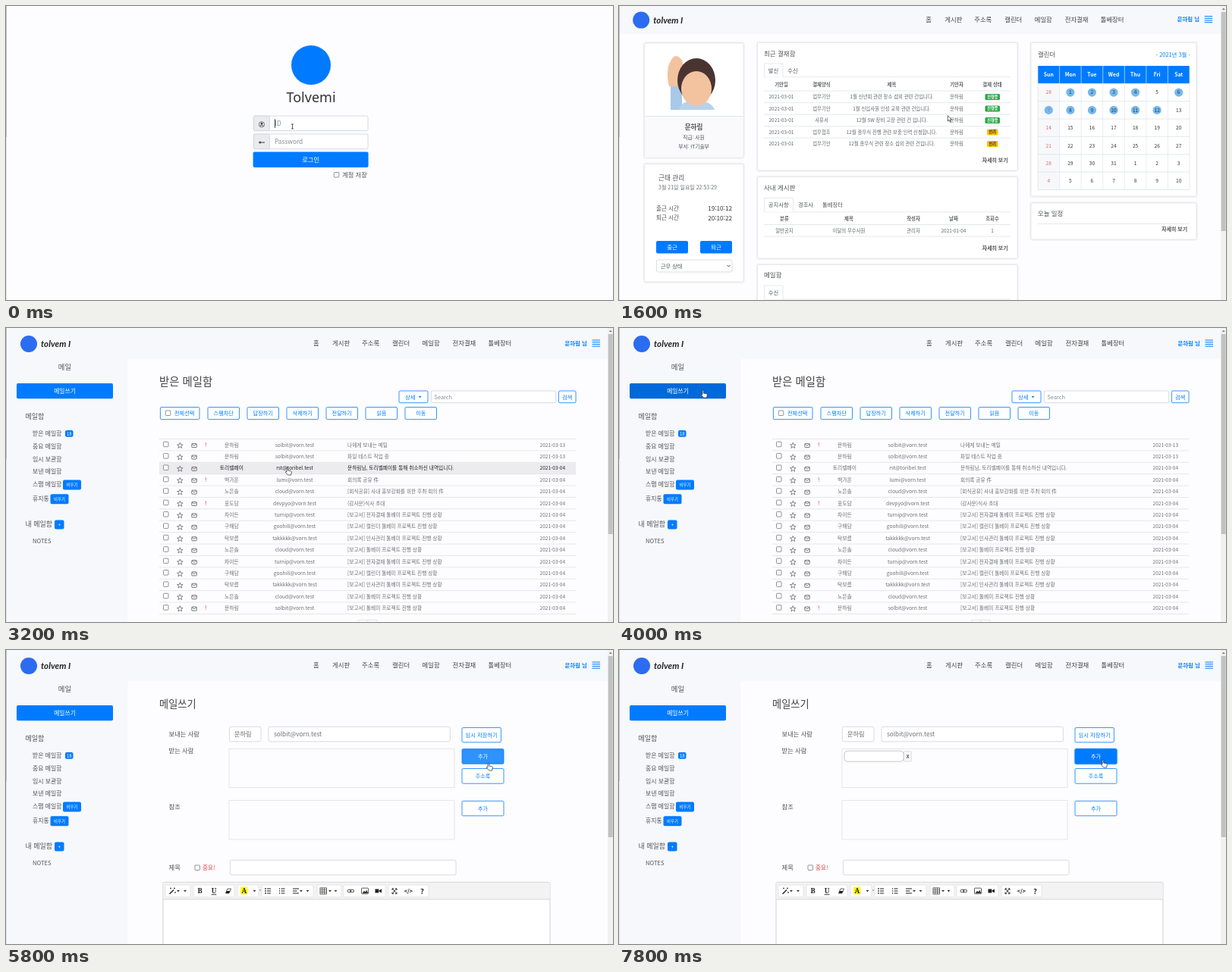
Animation of 800 by 388 pixels, one loop 8 s. Source, as an HTML page:

```html
<!DOCTYPE html>
<html lang="ko">
<head>
<meta charset="utf-8">
<title>Groupware</title>
<style>
html, body { margin: 0; width: 100%; height: 100%; overflow: hidden; background: #fdfcfe; }
svg {
  display: block; width: 100%; height: 100%;
  font-family: 'Noto Sans CJK KR', 'Noto Sans CJK', 'Noto Sans', sans-serif;
  font-variant-ligatures: no-contextual;
}
.card { filter: drop-shadow(0 .8px 1.2px rgba(0, 0, 0, .16)); }
</style>
</head>
<body>
<svg id="stage" viewBox="0 0 800 388"></svg>
<script>
const LOOP = 8000, STEP = 200;
const BLUE = '#007bff', DARK = '#0069d9', INK = '#505358', HINT = '#868e96';
const PALE = '#f6f8fb', LINE = '#dee2e6', EDGE = '#ced4da';
const MID = 'text-anchor="middle"', END = 'text-anchor="end"', BOLD = 'font-weight="700"';
const ME = '문하림', MY_MAIL = 'solbit@vorn.test';

// y is the optical middle of the text
const txt = (x, y, s, size = 8, fill = INK, more = '') =>
  `<text x="${x}" y="${(y + size * .37).toFixed(2)}" font-size="${size}" fill="${fill}" ${more}>${s}</text>`;
const mid = (x, y, s, size, fill, more = '') => txt(x, y, s, size, fill, MID + ' ' + more);
const box = (x, y, x2, y2, fill = '#fff', stroke = 'none', r = 0, more = '') =>
  `<rect x="${x}" y="${y}" width="${x2 - x}" height="${y2 - y}" fill="${fill}" stroke="${stroke}" stroke-width=".8" rx="${r}" ${more}/>`;
const path = (d, stroke = INK, w = .8, fill = 'none') =>
  `<path d="${d}" stroke="${stroke}" stroke-width="${w}" fill="${fill}"/>`;
const rule = (x, x2, y, c = LINE) => path(`M${x} ${y}H${x2}`, c, .8);
const dot = (x, y, r, fill, more = '') => `<circle cx="${x}" cy="${y}" r="${r}" fill="${fill}" ${more}/>`;
const tri = (x, y, c = '#333') => path(`M${x - 2} ${y - 1}h4l-2 2.3z`, 'none', 0, c);
const check = (x, y) => box(x, y, x + 6.5, y + 6.5, '#fff', '#777', 1);
const card = (x, y, x2, y2) => box(x, y, x2, y2, '#fff', '#e6e6ea', 1.5, 'class="card"');
const field = (x, y, x2, y2) => box(x, y, x2, y2, '#fff', EDGE, 2);
const solid = (x, y, x2, y2, s, size = 8, fill = BLUE) =>
  box(x, y, x2, y2, fill, 'none', 2) + mid((x + x2) / 2, (y + y2) / 2, s, size, '#fff');
const ring = (x, y, x2, y2) =>
  `<rect x="${x}" y="${y}" width="${x2 - x}" height="${y2 - y}" rx="2.5" fill="none" stroke="${BLUE}" stroke-opacity=".35" stroke-width="2.6"/>`;

// fade: 0 outlined, 1 filled
function outline(x, y, x2, y2, s, size = 7.2, fade = 0) {
  return box(x, y, x2, y2, '#fff', BLUE, 1.5) +
    box(x, y, x2, y2, BLUE, 'none', 1.5, `fill-opacity="${fade}"`) +
    mid((x + x2) / 2, (y + y2) / 2, s, size, fade > .5 ? '#fff' : BLUE);
}

// time, x, y of the pointer tip
const WAY = [
  [0, 377.5, 159], [400, 377, 159], [600, 375, 178], [800, 379, 190], [1000, 383, 199], [1200, 383, 199],
  [1400, 400, 182], [2000, 500, 70], [2400, 555, 17], [2600, 555, 16], [2800, 530, 60], [3200, 370, 184],
  [3600, 330, 187], [4000, 110, 82], [4200, 114, 86], [4400, 119.5, 97], [4800, 240, 150], [5400, 520, 175],
  [5800, 635, 149], [6000, 635, 146], [6200, 634, 160], [6400, 634, 164], [6600, 636, 149], [6800, 637, 145], [8000, 637, 145]
];
function pointer(t) {
  const i = Math.max(1, WAY.findIndex(k => k[0] >= t));
  const [a, b] = [WAY[i - 1], WAY[i]], p = (t - a[0]) / (b[0] - a[0]);
  return [a[1] + (b[1] - a[1]) * p, a[2] + (b[2] - a[2]) * p];
}
const inside = ([px, py], x, y, x2, y2) => px >= x && px <= x2 && py >= y && py <= y2;

const CURSOR = {
  arrow: path('M0 0V7.4L1.8 5.8 3 8.5l1.1-.5L2.9 5.4H5.2z', '#222', .7, '#fff'),
  hand: path('M0 .8C0-.4 1.7-.4 1.7.8V4l3.6.8c.9.2 1.2.8 1 1.6L5.6 10H1.6L-1.6 6.4c-.4-1 .6-1.3 1.6-.4z', '#222', .7, '#fff'),
  beam: path('M-1.5-3h3M0-3V3M-1.5 3h3', '#333', .8)
};

const SIGN_IN = [325.6, 192.6, 477.6, 213.1];
function login(t, at) {
  const filled = t >= 400, pass = t >= 600, dots = pass ? Math.min(4, (t - 400) / 100) : 0;
  const thin = 'font-weight="300" font-family="\'Noto Sans\', \'Open Sans\', sans-serif"';
  let s = dot(402, 78, 26, BLUE) + mid(402, 120.5, 'Tolvemi', 18, '#333', thin);
  for (const y of [145, 169]) {
    s += field(326.4, y, 477, y + 19.6) + box(326.4, y, 347.4, y + 19.6, '#e9ecef', EDGE, 1.5);
  }
  s += dot(337, 156.3, 3.6, 'none', 'stroke="#444" stroke-width=".7"') + dot(337, 155.2, 1.4, '#444') +
    path('M334.6 158.8c.6-2 4.2-2 4.8 0', '#444', 1) +
    dot(334.8, 180, 1.5, '#444') + path('M336 180h5m-1.2 0v1', '#444', .9);
  if (filled) s += box(347.4, 145, 477, 164.6, '#e8f0fe', EDGE, 1) + txt(354, 155, 'mira', 8.3);
  else s += txt(354.5, 155, 'ID', 8.3, HINT) + path('M354.5 149.3v11.5', '#222', .9);
  if (!filled && t > 0) s += ring(347.4, 145, 477, 164.6);
  if (pass) {
    s += ring(347.4, 169, 477, 188.6) + box(347.4, 169, 477, 188.6, '#fff', '#80bdff', 1);
    for (let i = 0; i < dots; i++) s += dot(355.6 + i * 2.7, 180, 1.1, '#333');
    s += path(`M${354.5 + dots * 2.7} 173.5v11`, '#222', .8);
  } else s += txt(354, 179, 'Password', 8.3, HINT);
  return s + solid(...SIGN_IN, '로그인', 8.3, inside(at, ...SIGN_IN) ? DARK : BLUE) +
    check(432.3, 219.5) + txt(443, 223, '계정 저장', 8.3);
}

const MENU = [[405, '홈'], [430, '게시판'], [469, '주소록'], [509, '캘린더'], [548.5, '메일함'], [588.5, '전자결재'], [635.5, '톨베장터']];
function header(dy) {
  let s = dot(30, 21, 11, '#2b6cf0') +
    txt(46, 20.8, 'tolvem I', 11.6, '#222', 'font-family="Lato, sans-serif" font-style="italic" font-weight="700"');
  for (const [x, name] of MENU) s += txt(x, 20, name, 8.4, '#444');
  s += txt(736.5, 20, ME + ' 님', 7.4, BLUE, BOLD);
  for (let i = 0; i < 4; i++) s += path(`M772.5 ${16 + i * 2.7}h10.5`, BLUE, 1);
  return `<g transform="translate(${dy / 3} ${dy})">${s}</g>`;
}
const scroll = end => box(793, 0, 800, 388, '#f1f1f1') + box(793.7, 8, 799.6, end, '#c1c1c1') +
  path('M794.8 5l2-2.2 2 2.2z', 'none', 0, '#777');

function tabs(y, y2, x2, names) {
  return rule(191, 516, y2) + path(`M191.4 ${y2}V${y}H${x2}V${y2}`, LINE, .8, '#fff') +
    names.map(([x, n]) => mid(x, (y + y2) / 2, n, 7.3)).join('');
}
const cells = (xs, y, vals, more) => vals.map((v, i) => mid(xs[i], y, v, 6.4, '#606368', more)).join('');

function avatar() {
  const skin = '#f3c3a0';
  return path('M68 137V105h15v32z', 'none', 0, '#a9c9e8') +
    path('M79 137c2-9 8-11 18-11h9c10 0 17 3 20 11z', 'none', 0, '#b7d2ec') +
    path('M66 106c-3-10-3-27 2-33 3-8 8-9 13-4 5 4 5 19 3 37z', 'none', 0, skin) +
    `<ellipse cx="102" cy="98" rx="25" ry="29" fill="#4a3431"/><ellipse cx="102" cy="109" rx="20" ry="23" fill="${skin}"/>`;
}

function calendar() {
  const w = 28.57, h = 23.35, x0 = 552, y0 = 79;
  let s = card(543, 48.5, 761, 251) + txt(552, 64, '캘린더', 8.4) + txt(753, 64, '- 2021년 3월 -', 7.4, BLUE, END) +
    box(x0, y0, 752, y0 + h, BLUE) + box(x0, y0 + h, x0 + w, 242.5, '#f7f8fa');
  ['Sun', 'Mon', 'Tue', 'Wed', 'Thu', 'Fri', 'Sat'].forEach((d, i) =>
    s += mid(x0 + w * (i + .5), y0 + 11.5, d, 6.8, '#fff', BOLD));
  for (let i = 0; i <= 7; i++) {
    s += path(`M${x0 + w * i} ${y0}V242.5`, i && i < 7 ? '#dfe6ee' : LINE, .7);
    if (i) s += rule(x0, 752, y0 + h * i);
  }
  for (let i = 0; i < 42; i++) {
    const x = x0 + w * (i % 7 + .5), y = y0 + h * (Math.floor(i / 7) + 1.5);
    if (i > 0 && i < 13 && i !== 5) s += dot(x, y, 5.6, '#74b9ee');
    s += mid(x, y, i ? (i - 1) % 31 + 1 : 28, 6.6, i % 7 ? '#333' : '#d9646c');
  }
  return s;
}

const DRAFTS = [
  ['업무기안', '1월 신년회 관련 장소 섭외 관련 건입니다.'], ['업무기안', '1월 신입사원 인성 교육 관련 건입니다.'],
  ['사유서', '12월 SW 장비 고장 관련 건 입니다.'], ['업무협조', '12월 종무식 진행 관련 보충 인력 신청합니다.'],
  ['업무기안', '12월 종무식 관련 장소 섭외 관련 건입니다.']
];
function dashboard(t) {
  const more = (x, y) => txt(x, y, '자세히 보기', 6.9, '#555', END + ' ' + BOLD);
  const sec = 30 + Math.floor((t - 2600) / 1000);
  let s = box(1, 0, 793, 36.5, PALE) + header(-2.4);

  s += card(33.5, 49, 164, 200) + box(34, 145.5, 163.6, 199.6, '#fafafc') + rule(34, 164, 145.5) + avatar() +
    mid(98.5, 160, ME, 8.6, '#555', BOLD) + mid(98.5, 173.5, '직급: 사원', 6.7) + mid(98.5, 186, '부서: IT기술부', 6.7);

  s += card(33.5, 208.5, 164, 364) + txt(52, 227, '근태 관리', 8.6) +
    txt(52, 239, `3월 21일 일요일 22:53:${sec}`, 7, '#6c6f74') +
    txt(49, 267, '출근 시간', 7.6) + txt(149, 267, '19:10:12', 8.2, '#333', END) +
    txt(49, 279.5, '퇴근 시간', 7.6) + txt(149, 279.5, '20:10:22', 8.2, '#333', END) +
    solid(49, 310, 91, 326.5, '출근', 7.4) + solid(107, 310, 149, 326.5, '퇴근', 7.4) +
    field(49.4, 335, 149, 351) + txt(55, 343, '근무 상태', 7.2) + path('M142.5 342l2 2 2-2', '#333', .9);

  const cols = [214, 267, 359.5, 445, 492];
  s += card(182.5, 48.5, 525, 217) + txt(191, 62.5, '최근 결재함', 8.5) +
    tabs(76, 93.7, 216, [[203.5, '발신'], [229, '수신']]) +
    cells(cols, 104, ['기안일', '결재양식', '제목', '기안자', '결재 상태'], BOLD) + rule(191, 516, 112);
  DRAFTS.forEach(([kind, title], i) => {
    const y = 120 + i * 15.5, open = i < 3;
    s += cells(cols, y, ['2021-03-01', kind, title, ME]) +
      box(open ? 482.5 : 485, y - 4, open ? 502 : 499.5, y + 4, open ? '#28a745' : '#ffc107', 'none', 1.5) +
      mid(492.3, y, open ? '진행중' : '반려', 5.2, open ? '#fff' : '#333', BOLD);
    if (i < 4) s += rule(191, 516, y + 7.7);
  });
  s += more(512.5, 203.5);

  const board = [218, 303, 388, 441, 492];
  s += card(182.5, 225.5, 525, 333) + txt(191, 239.5, '사내 게시판', 8.5) +
    tabs(253.5, 271.8, 229.5, [[210.3, '공지사항'], [246, '경조사'], [281.5, '톨베장터']]) +
    cells(board, 281, ['분류', '제목', '작성자', '날짜', '조회수'], BOLD) + rule(191, 516, 288.5) +
    cells(board, 297, ['일반공지', '이달의 우수사원', '관리자', '2021-01-04', '1']) + rule(191, 516, 304) + more(512.5, 319);
  s += card(182.5, 341.5, 525, 400) + txt(191, 355, '메일함', 8.5) + tabs(369, 387, 216, [[203.5, '수신']]);

  s += calendar() + card(543, 260, 761, 308) + txt(552, 273.5, '오늘 일정', 8.4) + rule(552, 752, 287.5) + more(749, 294.5);
  if (t >= 2400) s += box(0, 379.5, 82, 388, '#55565a', 'none', 1.5) + txt(3, 384.8, 'localhost:8888/email/index', 6.2, '#ddd');
  return s + scroll(297);
}

function mailFrame(hot) {
  let s = box(1, 0, 793, 41, PALE) + box(1, 0, 160, 388, PALE) + header(0) +
    mid(77.5, 52, '메일', 9.4) + solid(14, 73, 141, 93.3, '메일쓰기', 7.8, hot ? DARK : BLUE) +
    txt(25.5, 117, '메일함', 9) + txt(25.5, 258.5, '내 메일함', 9) + txt(35, 281, 'NOTES', 7.6);
  ['받은 메일함', '중요 메일함', '임시 보관함', '보낸 메일함', '스팸 메일함', '휴지통'].forEach((n, i) =>
    s += txt(35, i < 5 ? 139 + i * 16.8 : 225.5, n, 7.9));
  return s + solid(78, 135, 88.5, 143.8, '18', 6) + solid(75, 200.5, 99, 213.5, '비우기', 5.4) +
    solid(58.5, 219.3, 82.5, 232.3, '비우기', 5.4) + solid(64, 253.5, 76.5, 265.5, '+', 6.5);
}

const PEOPLE = {
  me: [ME, MY_MAIL], pay: ['토리벨페이', 'rst@toribel.test'], baek: ['백가온', 'lumi@vorn.test'],
  noh: ['노은솔', 'cloud@vorn.test'], pyo: ['표도담', 'devpyo@vorn.test'], cha: ['차이든', 'turnip@vorn.test'],
  goo: ['구해담', 'goohill@vorn.test'], tak: ['탁보름', 'takkkkk@vorn.test']
};
const report = part => `[보고서] ${part}톨베미 프로젝트 진행 상황`;
const REPORTS = [['cha', report('전자결재 ')], ['goo', report('캘린더 ')], ['tak', report('인사관리 ')], ['noh', report('')]];
const MAILS = [
  ['me', '나에게 보내는 메일', 1], ['me', '파일 테스트 작업 중'],
  ['pay', ME + '님, 토리벨페이를 통해 취소하신 내역입니다.'], ['baek', '회의록 공유 件', 1],
  ['noh', '[회식공유] 사내 홍보강화를 위한 주최 회의 件'], ['pyo', '(감사문)식사 초대', 1],
  ...REPORTS, ...REPORTS, ['me', report(''), 1]
];
const ROW = 15.39, TOP = 146.5;
const star = (x, y) => path(Array.from({ length: 10 }, (_, i) => {
  const a = (i / 5 - .5) * Math.PI, r = i % 2 ? 1.7 : 4;
  return (i ? 'L' : 'M') + (x + r * Math.cos(a)).toFixed(1) + ' ' + (y + r * Math.sin(a)).toFixed(1);
}).join('') + 'z', '#555', .7);

const rowAt = ([x, y]) => x > 202 && x < 751 && y > TOP ? Math.floor((y - TOP) / ROW) : -1;
function inbox(t, at) {
  const over = rowAt(at);
  let s = mailFrame(inside(at, 14, 73, 141, 93)) + txt(202, 70.5, '받은 메일함', 14.4, '#444') +
    outline(518, 83, 556, 98.7, '', 7) + txt(526, 91, '상세', 7.4, BLUE) + tri(545.5, 91, BLUE) +
    field(560.4, 83, 724.6, 98.7) + txt(564.5, 91, 'Search', 7.4, HINT) + outline(728.4, 83, 751, 98.7, '검색', 7.2);
  ['', '스팸차단', '답장하기', '삭제하기', '전달하기', '읽음', '이동'].forEach((n, i) => {
    const x = i ? 214 + i * 52 : 203.4;
    s += outline(x, 104.5, i ? x + 41.5 : 255, 120.6, n, 7.2);
  });
  s += check(210.3, 109) + txt(222, 112.5, '전체선택', 7.2, BLUE) + rule(202, 751, TOP);
  MAILS.forEach(([who, title, urgent], i) => {
    const y = TOP + ROW * (i + .5), c = i === over ? '#222' : '#6c6f74';
    if (i === over) s += box(202, y - ROW / 2, 751, y + ROW / 2, '#ececee');
    s += check(207.5, y - 4) + star(229.3, y + 1) + box(244.8, y - 1.6, 251.3, y + 3.4, 'none', '#555', .8) +
      path(`M245 ${y - 1}l3 2.2 3-2.2`, '#555', .7) +
      mid(297.5, y, PEOPLE[who][0], 6.8, c) + mid(380.5, y, PEOPLE[who][1], 6.7, c) +
      txt(450, y, title, 6.7, c) + txt(737, y, i < 2 ? '2021-03-13' : '2021-03-04', 6.5, c, END) + rule(202, 751, y + ROW / 2);
    if (urgent) s += mid(263.3, y, '!', 7.5, '#e0202e');
  });
  return s + box(464.5, 385.5, 477, 395, '#fff', LINE) + box(477, 385.5, 489, 395, '#fff', LINE) + scroll(272);
}

function toolbar() {
  const y = 318, lines = (x, ws) => ws.map((w, i) => path(`M${x} ${y - 3 + i * 3}h${w}`, '#333', 1.1)).join('');
  const serif = BOLD + ' font-family="\'Noto Serif\', serif"';
  let s = box(207, 306.4, 717, 400, '#fff', '#c6c6ca', 1.5) + box(207.4, 306.8, 716.6, 329, '#f3f3f4') + rule(207, 717, 329, '#ccc');
  for (const [a, b] of [[210, 243], [247, 301], [305, 333], [337, 405], [410, 442], [445, 500], [504, 557]]) s += box(a, 310, b, 326, '#fff', '#e0e0e3', 1);
  for (const x of [227, 236, 327.5, 389, 397.5, 427, 434.5]) s += tri(x, y);
  s += path('M215.5 322l5.5-5.5', '#222', 1.5) + path('M217 313.5v2m-1-1h2M222 313.5v2m-1-1h2M223 319v2m-1-1h2', '#222', .7);
  s += mid(255.5, y, 'B', 9.2, '#222', serif) + mid(274, y, 'U', 9, '#222', serif + ' text-decoration="underline"') +
    path('M289.5 321l2.5-6h4.5l-2.5 6z', '#222', .7) + path('M289.5 321l1.3-3h4.5l-1.3 3z', 'none', 0, '#222') +
    box(309, 312.5, 318.5, 322.5, '#ff0') + mid(313.8, y, 'A', 9, '#222', serif) + path('M335 316v2', '#555', .8);
  s += lines(344, [5, 5, 5]) + lines(362.5, [5, 5, 5]) + lines(378, [8, 5.5, 8]);
  for (let i = -1; i < 2; i++) s += dot(342, y + i * 3, .9, '#333') + path(`M360.5 ${y + i * 3 - 1}v2`, '#333', .8);
  s += box(414, 314, 422.5, 322, '#fff', '#333') + path('M414 316.7h8.5M414 319.4h8.5M416.8 314v8M419.6 314v8', '#333', .7);
  s += box(450, 316.2, 455, 319.8, 'none', '#222', 1.8) + box(453.5, 316.2, 458.5, 319.8, 'none', '#222', 1.8) +
    box(468.5, 314.2, 477.5, 321.8, '#fff', '#333', .8) + path('M469.5 321l2.5-3.2 1.6 1.5 1.8-2.5 1.7 4.2z', 'none', 0, '#333') +
    box(486.5, 315.5, 491.3, 320.5, '#222') + path('M491.5 317.5l3.5-2v5l-3.5-2z', 'none', 0, '#222');
  s += path('M509 317v-2.2h2.2M515 317v-2.2h-2.2M509 319.5v2.2h2.2M515 319.5v2.2h-2.2M509.3 315l5.4 6.4M514.7 315l-5.4 6.4', '#222', .9);
  return s + mid(530.3, y, '&lt;/&gt;', 7.2, '#222', BOLD) + mid(548.5, y, '?', 9.5, '#222', BOLD);
}

const ADD = [601, 130.6, 656, 150.2], BOOK = [601, 156.5, 656, 176.2];
function compose(t, at) {
  // a hover needs about one step to reach full colour
  const fade = area => inside(at, ...area) ? (inside(pointer(t - STEP), ...area) ? 1 : .82) : 0;
  const added = t >= 7600;
  let s = mailFrame(t <= 4400) + txt(202, 71, '메일쓰기', 13.2, '#444') +
    txt(214.5, 111, '보내는 사람', 8.3) + txt(214.5, 133, '받는 사람', 8.3) + txt(214.5, 206.5, '참조', 8.3) + txt(214.5, 287, '제목', 8.3) +
    field(294.4, 101.3, 336, 120.8) + txt(301, 111, ME, 8.2, '#666') +
    field(346, 101.3, 585.4, 120.8) + txt(353, 111, MY_MAIL, 8.2, '#6c6f74') +
    box(294, 130.3, 591, 181.6, '#fdfcfe', LINE) + box(294, 198.4, 591, 250, '#fdfcfe', LINE) +
    outline(601, 102.5, 652.4, 121.8, '임시 저장하기', 7.3) +
    (added ? ring(...ADD) : '') + outline(...ADD, '추가', 7, added ? 1 : fade(ADD)) +
    outline(...BOOK, '주소록', 7, fade(BOOK)) + outline(601, 199.3, 656, 218.8, '추가', 7) +
    check(249, 284) + txt(259, 287.3, '중요!', 7.7, '#e8404a') + field(295.4, 277.3, 593, 296.8) + toolbar();
  if (added) s += box(297, 133.2, 375, 147.2, '#fff', '#bbb', 4) + box(375.5, 133.8, 385.3, 147, '#f8f8f8', '#d4d4d8', 1) + mid(380.5, 140.3, 'x', 7.5, '#222');
  return s + scroll(247);
}

function cursorAt(t, at) {
  if (t < 1400) return inside(at, ...SIGN_IN) ? 'hand' : 'beam';
  if (t < 2800) return inside(at, 404, 12, 667, 26) ? 'hand' : 'arrow';
  if (inside(at, 14, 73, 141, 93)) return 'hand';
  if (t < 4200) return rowAt(at) >= 0 ? 'hand' : 'arrow';
  return inside(at, ...ADD) || inside(at, ...BOOK) ? 'hand' : 'arrow';
}

function draw(t) {
  const at = pointer(t), page = t < 1400 ? login : t < 2800 ? dashboard : t < 4200 ? inbox : compose;
  return box(0, 0, 800, 388, '#fdfcfe') + page(t, at) +
    path('M.5 0V173', '#bdbdc2', 1) + path('M.5 173V388', '#e2e2e6', 1) +
    `<g transform="translate(${at[0]} ${at[1]})">${CURSOR[cursorAt(t, at)]}</g>`;
}

const stage = document.getElementById('stage'), start = performance.now();
let shown = -1;
function tick() {
  const t = Math.floor((performance.now() - start) % LOOP / STEP) * STEP;
  if (t !== shown) stage.innerHTML = draw(shown = t);
  requestAnimationFrame(tick);
}
tick();
</script>
</body>
</html>
```
